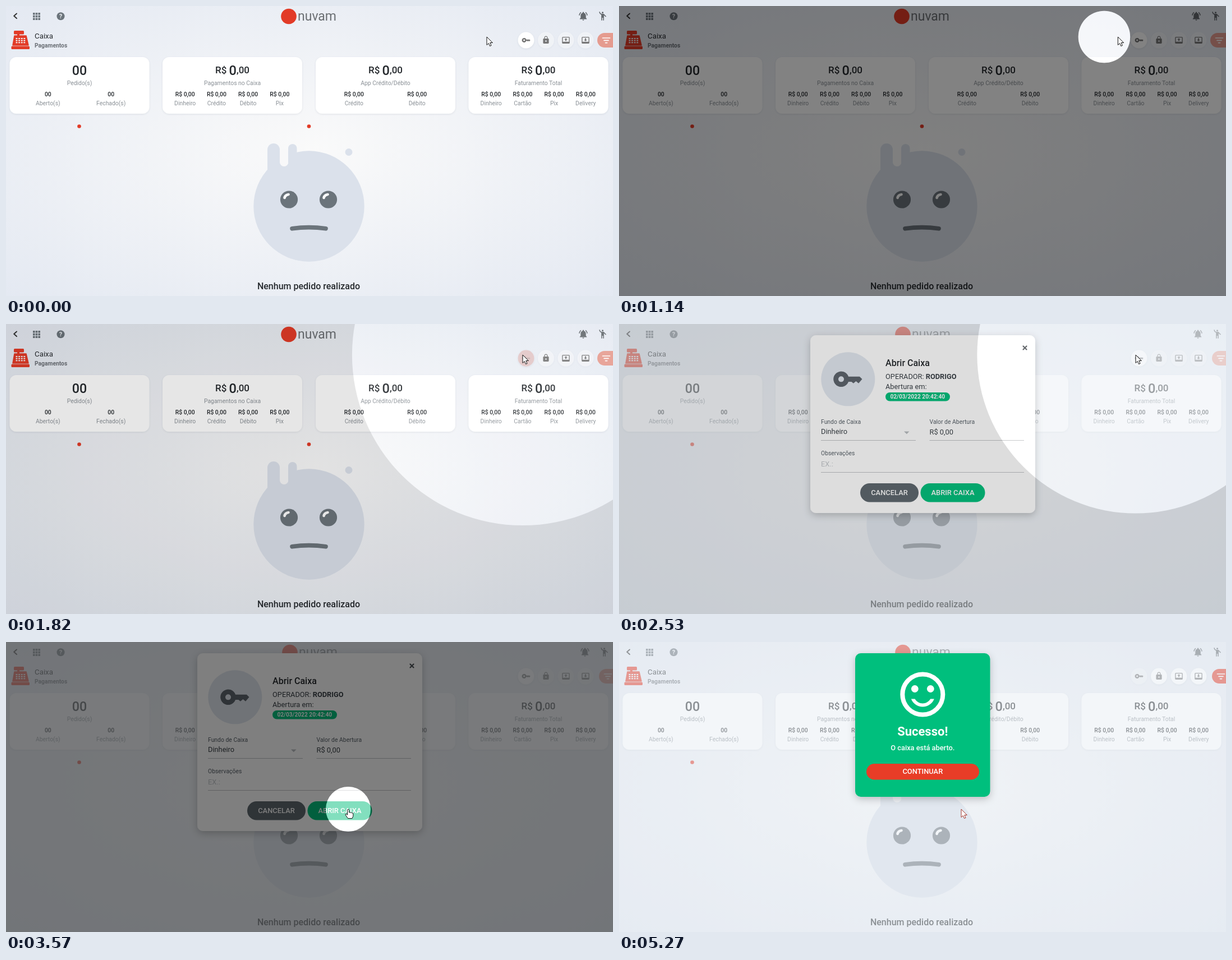
An HTML page that plays this animation: 1082x517 px, repeating every 5.46 s.

```html
<!DOCTYPE html>
<html lang="pt">
<head>
<meta charset="utf-8">
<style>
html, body { margin: 0; width: 100%; height: 100%; overflow: hidden; }
svg { display: block; width: 100%; height: 100%; font-family: Roboto, Arial, sans-serif; }
</style>
</head>
<body>
<svg id="stage" viewBox="0 0 1082 517"></svg>
<script>
const LOOP = 5460, GREEN = '#04bf7d', RED = '#e23b27', INK = '#25292d', GREY = '#8a9096', SLATE = '#6b747b';

// Drawing helpers
const text = (x, y, size, str, fill = INK, weight = 400, anchor = 'start', id = '') =>
  `<text x="${x}" y="${y}" font-size="${size}" fill="${fill}" font-weight="${weight}" text-anchor="${anchor}" ${id && `id="${id}"`}>${str}</text>`;
const mid = (x, y, size, str, fill, weight) => text(x, y, size, str, fill, weight, 'middle');
const rect = (x, y, w, h, r, fill, more = '') =>
  `<rect x="${x}" y="${y}" width="${w}" height="${h}" rx="${r}" fill="${fill}" ${more}/>`;
const dot = (x, y, r, fill, more = '') => `<circle cx="${x}" cy="${y}" r="${r}" fill="${fill}" ${more}/>`;
const path = (d, fill, more = '') => `<path d="${d}" fill="${fill}" ${more}/>`;
const line = (d, stroke, width) => path(d, 'none', `stroke="${stroke}" stroke-width="${width}" stroke-linecap="round" stroke-linejoin="round"`);
// Places a 24-unit icon around a centre
const icon = (x, y, scale, body) => `<g transform="translate(${x} ${y}) scale(${scale}) translate(-12 -12)">${body}</g>`;

const keyIcon = fill => path('M12.65 10A6 6 0 1 0 12.65 14H15l1.5 1.2 2-1.6 2 1.6L23.3 12l-2-2zM7 14.2a2.2 2.2 0 1 1 0-4.4 2.2 2.2 0 0 1 0 4.4z', fill, 'fill-rule="evenodd"');
const lockIcon = path('M18 8h-1V6c0-2.76-2.24-5-5-5S7 3.24 7 6v2H6c-1.1 0-2 .9-2 2v10c0 1.1.9 2 2 2h12c1.1 0 2-.9 2-2V10c0-1.1-.9-2-2-2zm-6 9c-1.1 0-2-.9-2-2s.9-2 2-2 2 .9 2 2-.9 2-2 2zm3.1-9H8.9V6a3.1 3.1 0 0 1 6.2 0z', '#777');
const trayIcon = arrow => rect(3, 4, 18, 16, 1.5, 'none', 'stroke="#777" stroke-width="2"') +
  rect(3, 16, 18, 4, 1, '#777') + path(arrow, '#777');
const bellIcon = path('M12 22c1.1 0 2-.9 2-2h-4c0 1.1.89 2 2 2zm6-6v-5c0-3.07-1.64-5.64-4.5-6.32V4a1.5 1.5 0 0 0-3 0v.68C7.63 5.36 6 7.92 6 11v5l-2 2v1h16v-1zM7.58 4.08L6.15 2.65C3.75 4.48 2.17 7.3 2.03 10.5h2c.15-2.65 1.51-4.97 3.55-6.42zm12.39 6.42h2c-.15-3.2-1.73-6.02-4.12-7.85l-1.42 1.43c2.02 1.45 3.39 3.77 3.54 6.42z', '#63686d');
const personIcon = dot(12, 4, 2, '#63686d') +
  path('M15.89 8.11C15.5 7.72 14.83 7 13.53 7h-2.54C8.24 6.99 6 4.75 6 2H4c0 3.16 2.11 5.84 5 6.71V22h2v-6h2v6h2V10.05L18.95 14l1.41-1.41z', '#63686d');

function card(x, title, label, names, value = 'R$ 0,00') {
  const c = x + 124.5, step = names.length > 2 ? 56.2 : 112.4;
  return rect(x, 91, 249, 101, 12, '#fff', 'filter="url(#soft)"') + title(c) + mid(c, 140.5, 10.4, label, GREY) +
    names.map((name, i) => {
      const nx = c + (i - (names.length - 1) / 2) * step;
      return mid(nx, 161, 10.4, value, INK, 500) + mid(nx, 176.5, 10.4, name, GREY);
    }).join('');
}
const count = c => mid(c, 123, 23.2, '00', INK, 500);
const money = c => mid(c, 120, 17, 'R$ <tspan dy="3" font-size="23.5">0</tspan><tspan dy="-3">,00</tspan>', INK, 500);

const grid = [...Array(9)].map((_, i) => rect(48 + i % 3 * 4.7, 12 + (i / 3 | 0) * 4.7, 3.6, 3.6, 0, SLATE)).join('');

const register =
  rect(14, 44, 18, 6.5, 1.5, RED) + rect(20, 50, 4, 4, 0, RED) +
  path('M15 53H36l4 17H12z', RED, `stroke="${RED}" stroke-width="1.5" stroke-linejoin="round"`) + rect(9.5, 71.5, 32.5, 5.5, 1.5, RED) +
  [...Array(12)].map((_, i) => rect(17.5 + i % 4 * 4.6, 57 + (i / 4 | 0) * 3.6, 3, 2.1, .6, '#f4f5f7')).join('');

const face =
  rect(466, 245, 22, 90, 11, '#dbe1eb') + dot(540, 357, 98.7, '#dbe1eb') +
  rect(488, 255, 15.5, 31, 7.7, '#f8f8f9') + rect(503, 246, 15.5, 40, 7.7, '#dbe1eb') + dot(611, 260.5, 6.5, '#dbe1eb') +
  [504.5, 574.5].map(x => dot(x, 345, 15.6, SLATE) + line(`M${x - 8} 342q1-5 7-6`, '#fff', 4.6)).join('') +
  line('M510 396.8Q540 392.5 570 396.8', SLATE, 7.6);

const page =
  rect(0, 0, 1082, 517, 0, 'url(#back)') + line('M19 13.5l-4.8 4.3 4.8 4.3', '#333', 2) + grid +
  dot(97.5, 18.3, 7, SLATE) + mid(97.5, 22.2, 11, '?', '#eef1f5', 700) +
  `<g id="brand">${dot(504, 18.5, 13.8, RED) + text(520, 25.5, 23, 'nuvam', '#6b6f73')}</g>` +
  register + text(51, 57.5, 13.3, 'Caixa', INK, 400) + text(51, 73.5, 10.3, 'Pagamentos', '#6a6f75', 700) +
  [927, 962.5, 998, 1033].map((x, i) => dot(x, 61, 14.4, '#fff', `id="act${i}" filter="url(#soft)"`)).join('') +
  `<g id="key">${icon(927, 61, .68, keyIcon('#777'))}</g>` + icon(962.5, 60.5, .64, lockIcon) +
  icon(998, 61, .68, trayIcon('M12 6.5l4 4h-2.5V14h-3v-3.500H8z')) + icon(1033, 61, .68, trayIcon('M12 15l4-4h-2.5V7h-3v4H8z')) +
  `<g id="side">${icon(1029, 18, .78, bellIcon) + icon(1063.5, 18, .78, personIcon) +
    rect(1054, 48, 44, 26, 13, '#e59b8f', 'id="filter"') + line('M1063.500 57h13M1066 61.300h8M1068.500 65.600h3', '#fff', 1.7)}</g>` +
  card(6.5, count, 'Pedido(s)', ['Aberto(s)', 'Fechado(s)'], '00') +
  card(279, money, 'Pagamentos no Caixa', ['Dinheiro', 'Crédito', 'Débito', 'Pix']) +
  card(552, money, 'App Crédito/Débito', ['Crédito', 'Débito']) +
  card(824.5, money, 'Faturamento Total', ['Dinheiro', 'Cartão', 'Pix', 'Delivery']) +
  dot(130.5, 214.5, 3.3, RED) + dot(540, 214.5, 3.3, RED) + face +
  mid(539.5, 505, 16, 'Nenhum pedido realizado', INK, 500);

const FIELD = '#555e66', BODY = '#3a4147';
const form =
  rect(341, 20, 401, 317, 10, '#fff', 'filter="url(#deep)"') +
  dot(408.3, 98.3, 48, '#e2e8f0') + icon(407.500, 98.300, 2.3, keyIcon('#5f666e')) +
  line('M720.500 39.500l6 6m0-6l-6 6', '#4d5257', 2.2) +
  text(475, 74.5, 16, 'Abrir Caixa', INK, 500) + text(475, 98, 12.8, 'OPERADOR: <tspan font-weight="700">RODRIGO</tspan>', BODY) +
  text(475, 115.500, 12.8, 'Abertura em:', BODY) + rect(475, 122, 115, 15.5, 7.7, GREEN) +
  text(532.300, 133.3, 10.2, '', '#fff', 700, 'middle', 'clock') +
  text(360, 177.5, 10.4, 'Fundo de Caixa', FIELD) + text(360, 195.5, 12.8, 'Dinheiro', BODY) +
  text(553.5, 177.5, 10.4, 'Valor de Abertura', FIELD) + text(553.5, 197, 12.8, 'R$ 0,00', BODY) +
  text(360, 234, 10.4, 'Observações', FIELD) + text(360, 254, 12.8, 'EX.:', '#c3c7cb') +
  path('M508 191.500h9.500l-4.700 4.700z', '#b9bdc1') +
  path('M360 207.500h169M553.500 207.500H722M360 264.500h362', 'none', 'stroke="#bfc2c5"') +
  rect(430, 284, 104, 33.5, 16.7, '', 'id="cancel"') + rect(537.5, 284, 115, 33.5, 16.7, '', 'id="ok"') +
  mid(482, 305, 12.9, 'CANCELAR', '#fff', 500) + mid(595, 305, 12.9, 'ABRIR CAIXA', '#fff', 500);

const success =
  rect(421, 20, 240.5, 256, 10, GREEN, 'filter="url(#deep)"') +
  icon(541.3, 93.5, 4, dot(12, 12, 9, 'none', 'stroke="#fff" stroke-width="2"') + dot(8.5, 9.5, 1.6, '#fff') + dot(15.5, 9.5, 1.6, '#fff') +
    path('M12 16c-1.480 0-2.750-.81-3.450-2H6.880c.8 2.050 2.790 3.500 5.120 3.500s4.320-1.450 5.120-3.500h-1.670c-.69 1.190-1.970 2-3.450 2z', '#fff')) +
  mid(541.3, 167, 22, 'Sucesso!', '#fff', 700) + mid(541.3, 192.5, 12.8, 'O caixa está aberto.', '#fff', 500) +
  rect(441, 217, 201, 28.5, 14.2, '#e83d27') + mid(541.3, 235.3, 12.9, 'CONTINUAR', '#fff', 500);

stage.innerHTML =
  `<defs>
    <radialGradient id="back" r=".707"><stop offset="0" stop-color="#fafafa"/><stop offset="1" stop-color="#e4e9f2"/></radialGradient>
    <filter id="soft" x="-20%" y="-20%" width="140%" height="140%"><feDropShadow dx="0" dy="1" stdDeviation="1.5" flood-color="#456" flood-opacity=".13"/></filter>
    <filter id="deep" x="-20%" y="-20%" width="140%" height="140%"><feDropShadow dx="0" dy="4" stdDeviation="7" flood-opacity=".22"/></filter>
  </defs>` + page + rect(0, 0, 1082, 517, 0, '#e9edf3', 'id="veil"') +
  `<g id="form">${form}</g><g id="success">${success}</g>` +
  path('', '#000', 'id="shade" fill-rule="evenodd"') + dot(0, 0, 40, '#fff', 'id="glow"') +
  `<g id="cursor">${path('M0 0V14.500l3.300-3 2.200 5 2.500-1.100-2.200-4.900h4.500z', '#fff', 'id="arrow" stroke-linejoin="round"')}
    ${path('M-1.500 1.200q1.500-2.200 3 0V6q1.500-1.200 2.500.3 1.500-1 2.500.5 2-.6 2.300 1.200v4.500l-1.800 4H-.5l-4.500-6.500q0-2 1.800-1.400l1.700 1.600z', '#fff', 'id="hand" stroke="#111" stroke-linejoin="round"')}</g>`;

const $ = id => document.getElementById(id);
const set = (id, attrs) => { for (const k in attrs) $(id).setAttribute(k, attrs[k]); };
const clamp = x => Math.min(1, Math.max(0, x));
const ease = x => { x = clamp(x); return x * x * (3 - 2 * x); };

// Bursts of evenly spaced updates: start, end, number of steps
const bursts = [[810, 1350, 9], [1430, 1950, 9], [2030, 2180, 3], [2530, 3070, 9], [3160, 3670, 8], [3740, 4090, 6], [4930, 5270, 6]];
function snap(t) {
  const burst = bursts.findLast(b => t >= b[0]);
  if (!burst) return 0;
  const [start, end, n] = burst, gap = (end - start) / (n - 1);
  return start + gap * Math.min(n - 1, Math.floor((t - start + 10) / gap));
}

function pointer(t) {
  const a = ease((t - 810) / 670), b = ease((t - 2530) / 800);
  return { x: 857 + 64 * a - 311 * b, y: 55 + 243 * b, b };
}

// Spotlight opening: 1 is fully open, 0 is fully narrowed
function spread(t, [close, open]) {
  return t < open ? (1 - clamp((t - close) / 470)) ** 2 : 1 - (1 - clamp((t - open) / 470)) ** 2;
}

function draw(now) {
  const t = snap(now % LOOP);

  const formIn = Math.min(clamp((t - 1960) / 200), clamp(1 - (t - 4880) / 170));
  const doneIn = clamp((t - 5050) / 200), modal = Math.max(formIn, doneIn);
  set('veil', { opacity: modal * .52 });
  set('form', { opacity: formIn, transform: `translate(0 ${t > 4900 ? -30 * (1 - formIn) : 0})` });
  set('success', { opacity: doneIn, transform: `translate(0 ${-30 * (1 - doneIn)})` });
  set('side', { transform: `translate(${modal ? 3 : 0} 0)` });
  set('brand', { transform: `translate(${modal ? 2 : 0} 0)` });

  const opened = t >= 5050, hover = t >= 1350 && t < 2030;
  for (let i = 0; i < 4; i++) set('act' + i, { 'fill-opacity': (i > 0) === opened ? 1 : .45 });
  set('act0', { fill: hover ? '#e2c6c6' : '#fff' });
  set('key', { opacity: hover ? .25 : 1 });
  set('filter', { fill: opened ? RED : '#e59b8f' });

  const busy = t >= 3870 && t < 5050;
  set('cancel', { fill: busy ? '#bcc0c4' : '#5f686f' });
  set('ok', { fill: busy ? '#8cdbc0' : GREEN });
  $('clock').textContent = '02/03/2022 20:42:4' + (busy ? 2 : 0);

  const p = Math.min(spread(t, [742, 1560]), spread(t, [2463, 3650]));
  const r = 40 + 330 * p, { x, y } = pointer(t - 190), tint = (1 - p) / 2;
  set('shade', { opacity: tint, d: `M0 0H1082V517H0zM${x - r} ${y}a${r} ${r} 0 1 0 ${2 * r} 0a${r} ${r} 0 1 0 ${-2 * r} 0z` });
  set('glow', { cx: x, cy: y, r, opacity: tint });

  const tip = pointer(t), hand = tip.b > .94 && t < 3740;
  set('cursor', { transform: `translate(${tip.x} ${tip.y})` });
  set('hand', { opacity: +hand });
  set('arrow', { opacity: +!hand, stroke: opened ? '#a3352a' : '#111' });
}

const begin = performance.now();
(function tick() {
  draw(performance.now() - begin);
  requestAnimationFrame(tick);
})();
</script>
</body>
</html>
```
